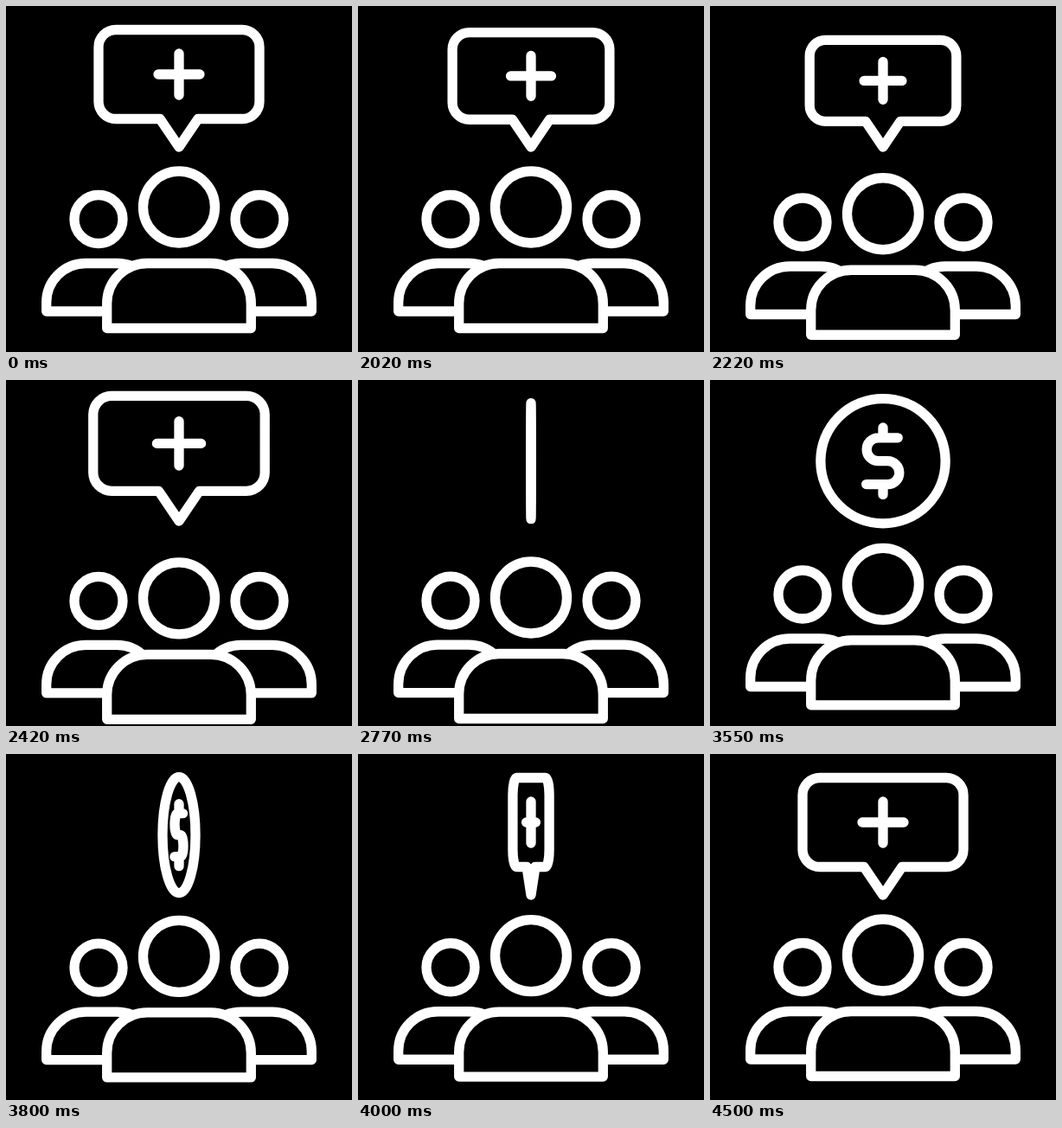
Recreate the animation shown at these times as an HTML page with a canvas. Size 400x400 px, loop 4.52 s.

```html
<!DOCTYPE html>
<html lang="en">
<head>
<meta charset="utf-8">
<style>
  html, body { margin: 0; height: 100%; overflow: hidden; background: #000; }
  canvas { display: block; width: 100vw; height: 100vh; object-fit: contain; }
</style>
</head>
<body>
<canvas width="400" height="400"></canvas>
<script>
const ctx = document.querySelector('canvas').getContext('2d');
const LOOP = 4520, START = 2020, TO_COIN = 2760, TO_BUBBLE = 3910;

// Times in ms with values, eased between neighbours
const SIZE = [[1985, 1], [2120, .87], [2470, 1.078], [2700, 1], [2960, 1], [3095, .88], [3520, 1.082], [3720, 1]];
const TURN = [[2490, 1], [TO_COIN, 0], [3030, 1], [3600, 1], [TO_BUBBLE, 0], [4205, 1]];
const DROP = [[2060, 0], [2440, 20], [2520, 20], [4390, 0, .4, .2]];

// Shapes that scale are drawn around their anchor point
const bubble = new Path2D(`M-22-32.5H-73a20 20 0 0 1-20-20V-115.5a20 20 0 0 1 20-20H73
  a20 20 0 0 1 20 20V-52.5a20 20 0 0 1-20 20H22L0 0ZM-24-84H24M0-108V-60`);
const coin = new Path2D(`M67 0A67 67 0 1 1-67 0A67 67 0 1 1 67 0ZM0-36V-25M0 25V36
  M16-25H-5a12.5 12.5 0 0 0 0 25H5a12.5 12.5 0 0 1 0 25H-18`);
const leader = new Path2D('M116.7 372.5V344a46.5 46.5 0 0 1 46.5-46.5H236.8a46.5 46.5 0 0 1 46.5 46.5V372.5Z');
const member = new Path2D('M46.7 353V343a45.5 45.5 0 0 1 45.5-45.5H128a45.5 45.5 0 0 1 45.5 45.5V353Z');

// Cubic bezier (x1, 0, x2, 1), solved by bisection
function ease(u, x1, x2) {
  let low = 0, high = 1, s;
  for (let i = 0; i < 20; i++) {
    s = (low + high) / 2;
    const x = 3 * (1 - s) ** 2 * s * x1 + 3 * (1 - s) * s * s * x2 + s ** 3;
    if (x < u) low = s; else high = s;
  }
  return s * s * (3 - 2 * s);
}

function track(keys, t) {
  const i = keys.findIndex(key => key[0] > t);
  if (i < 0) return keys[keys.length - 1][1];
  if (i === 0) return keys[0][1];
  const [t0, v0] = keys[i - 1];
  const [t1, v1, x1 = 1 / 3, x2 = 2 / 3] = keys[i];
  return v0 + (v1 - v0) * ease((t - t0) / (t1 - t0), x1, x2);
}

// Only the path is transformed, so the line weight stays constant
function outline(path, x, y, sx = 1, sy = 1) {
  const placed = new Path2D();
  placed.addPath(path, new DOMMatrix([sx, 0, 0, sy, x, y]));
  ctx.fill(placed);
  ctx.stroke(placed);
}

function head(x, y, r) {
  ctx.beginPath();
  ctx.arc(x, y, r, 0, Math.PI * 2);
  ctx.stroke();
}

function draw(t) {
  if (t < START) t = 0;
  ctx.fillStyle = '#000';
  ctx.strokeStyle = '#fff';
  ctx.lineWidth = 11.3;
  ctx.lineCap = ctx.lineJoin = 'round';
  ctx.fillRect(0, 0, 400, 400);

  const drop = track(DROP, t), sideDrop = drop * .45;
  outline(member, 0, sideDrop);
  outline(member, 400, sideDrop, -1);
  outline(leader, 0, drop);
  head(107, 246.5 + sideDrop, 28);
  head(293, 246.5 + sideDrop, 28);
  head(200, 232.5 + drop, 41.5);

  const size = track(SIZE, t), width = size * Math.max(track(TURN, t), .001);
  if (t > TO_COIN && t < TO_BUBBLE) outline(coin, 200, 93.7, width, size);
  else outline(bubble, 200, 163, width, size);
}

function tick() {
  draw(performance.now() % LOOP);
  requestAnimationFrame(tick);
}
tick();
</script>
</body>
</html>
```
